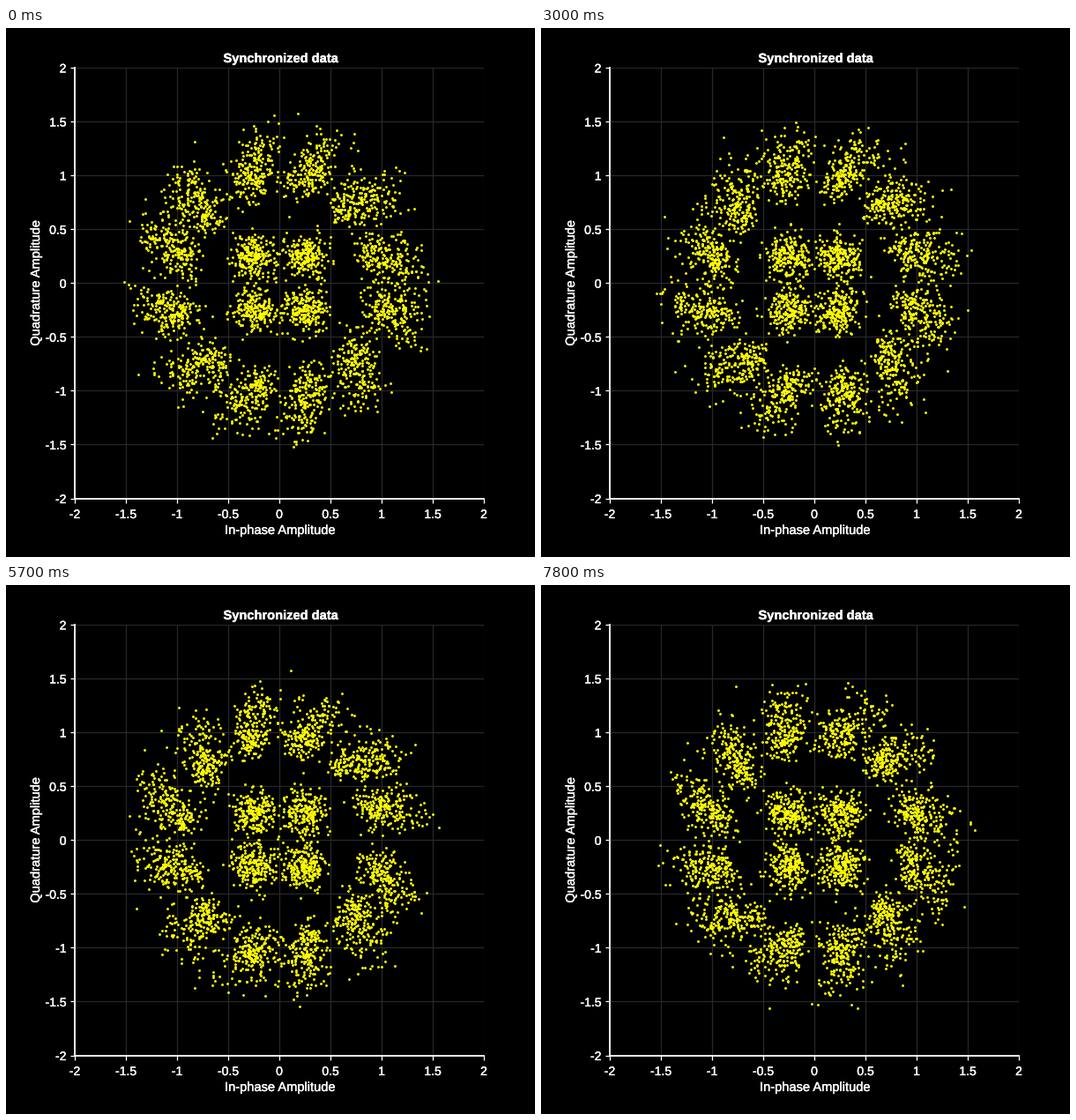
Recreate the animation shown at these times as a matplotlib script. Size 600 px wide and 600 px high, loop 8 s.

```python
import numpy as np
import matplotlib.pyplot as plt
from matplotlib.animation import FuncAnimation
from matplotlib.patheffects import withStroke

SIZE, DPI = 600, 96
INTERVAL, FRAMES, HOLD = 100, 80, 3   # a new burst of symbols every 300 ms
PER_SYMBOL = 215

plt.rcParams["font.family"] = "Liberation Sans"


def pt(px):
    return px * 72 / DPI


HEAVIER = [withStroke(linewidth=pt(0.35), foreground="white")]


def label(x, y, text, **style):
    fig.text(x / SIZE, 1 - y / SIZE, text, color="white", fontsize=11,
             ha="center", path_effects=HEAVIER, **style)


def inner_ring(rng):
    """Four compact clusters around the centre."""
    k = np.repeat(np.arange(4), PER_SYMBOL)
    angle = np.pi / 4 + k * np.pi / 2
    centre = 0.35 * np.exp(1j * angle)
    noise = rng.normal(0, 0.108, (2, k.size))
    return centre + noise[0] + 1j * noise[1]


def outer_ring(rng):
    """Twelve clusters stretched outwards, lagging in phase as they grow."""
    k = np.repeat(np.arange(12), PER_SYMBOL)
    share = rng.uniform(0.4, 0.6, 12)[k]
    core = rng.random(k.size) < share
    radius = np.where(core, rng.normal(0.99, 0.1, k.size),
                      rng.normal(1.21, 0.14, k.size))
    radius = np.clip(radius, 0.72 + 0.1 * rng.random(k.size), 1.62)
    drift = rng.normal(0, 1.5, 12)[k] * np.where(core, 0.3, 1)
    spread = rng.uniform(5.5, 7, 12)[k]
    degrees = (15 + 30 * k + 1 - 16 * (radius - 1) + drift
               + spread * rng.normal(size=k.size))
    return radius * np.exp(1j * np.radians(degrees))


def burst(n):
    rng = np.random.default_rng(100 + n)
    return np.concatenate([inner_ring(rng), outer_ring(rng)])


fig = plt.figure(figsize=(SIZE / DPI, SIZE / DPI), dpi=DPI, facecolor="black")
left, right, top, bottom = 78, 542, 45, 533.5
ax = fig.add_axes([left / SIZE, 1 - bottom / SIZE,
                   (right - left) / SIZE, (bottom - top) / SIZE],
                  facecolor="black")
ticks = np.arange(-2, 2.1, 0.5)
names = [f"{v:g}" for v in ticks]
ax.set(xlim=(-2, 2), ylim=(-2, 2))
ax.set_xticks(ticks, names)
ax.set_yticks(ticks, names)
ax.set_axisbelow(True)
ax.grid(color="#282828", linewidth=pt(1.3))
ax.tick_params(colors="white", labelsize=10.5, length=pt(5), width=pt(1.3))
ax.tick_params(axis="x", pad=pt(6.5))
ax.tick_params(axis="y", pad=pt(4.5))
for text in ax.get_xticklabels() + ax.get_yticklabels():
    text.set_path_effects(HEAVIER)
ax.spines[["top", "right"]].set_visible(False)
for side in ("left", "bottom"):
    ax.spines[side].set(color="white", linewidth=pt(1.8))

label(311.5, 39, "Synchronized data", weight="bold", va="baseline")
label(311, 574, "In-phase Amplitude", va="baseline")
label(34, 289, "Quadrature Amplitude", rotation=90, va="center")

dots, = ax.plot([], [], "o", color="yellow", markersize=pt(2.9),
                markeredgewidth=0, clip_on=False)


def update(i):
    z = burst(i // HOLD)
    dots.set_data(z.real, z.imag)
    return dots,


anim = FuncAnimation(fig, update, frames=FRAMES, interval=INTERVAL,
                     repeat=True, repeat_delay=0)
plt.show()
```
